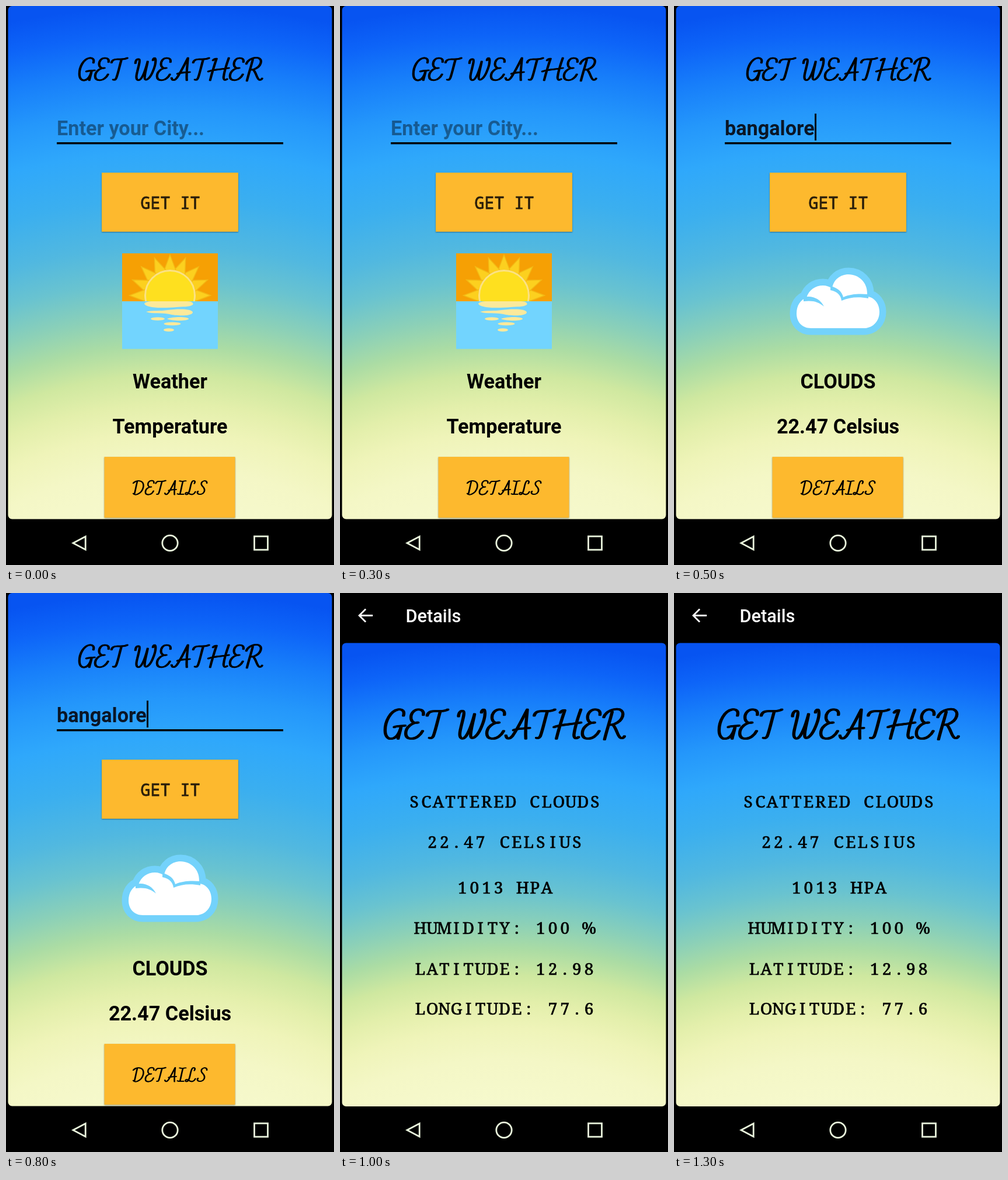
Write an HTML page that moves like this. It is 562 by 956 pixels and loops after 1500 ms.

```html
<!DOCTYPE html>
<html lang="en">
<head>
<meta charset="utf-8">
<title>Get Weather</title>
<style>
  html, body { margin: 0; width: 100%; height: 100%; overflow: hidden; background: #000; }
  svg { display: block; width: 562px; height: 956px; }
  text { font-family: Roboto, sans-serif; }
  .bold { font-weight: 700; font-size: 34.2px; }
  .mid { text-anchor: middle; }
  .mono { font: 500 28.3px "Noto Sans Mono", monospace; fill: #2a1e0a; stroke: #2a1e0a; stroke-width: .8; }
  .slab { font: 400 28px "Noto Serif", serif; stroke: #000; stroke-width: .7; text-anchor: middle; }
  .button { fill: #fdb92e; filter: drop-shadow(0 1px 1px rgba(0, 0, 0, .4)); }
  .script { fill: none; stroke: #000; stroke-width: 2.7; stroke-linecap: round; stroke-linejoin: round; }
  .nav { fill: none; stroke: #e9f4dc; stroke-width: 2.8; }
  .screen { opacity: 0; }
</style>
</head>
<body>
<svg viewBox="0 0 562 956">
  <defs>
    <radialGradient id="sky" gradientUnits="userSpaceOnUse" cx="281"></radialGradient>
    <clipPath id="horizon"><rect x="199" y="423" width="164" height="82"/></clipPath>
  </defs>
  <rect width="562" height="956"/>

  <g class="screen" data-from="0" data-to="2">
    <rect x="3.5" width="555" height="877.5" rx="7" fill="url(#sky)"/>
    <g class="script" data-word="GET WEATHER" transform="translate(124 88)"/>
    <rect x="87" y="233" width="388" height="3.4"/>
    <rect class="button" x="164" y="285" width="234" height="101"/>
    <text class="mono mid" x="281.5" y="347">GET IT</text>
    <rect class="button" x="168.5" y="771" width="224" height="104"/>
    <g class="script" data-word="DETAILS" transform="translate(217 811) scale(.63)"/>
  </g>

  <g class="screen" data-from="0" data-to="1">
    <text class="bold" x="87" y="221" fill="#000" fill-opacity=".42">Enter your City...</text>
    <rect x="199" y="423" width="164" height="82" fill="#f6a004"/>
    <rect x="199" y="505" width="164" height="81.5" fill="#72d4fe"/>
    <g clip-path="url(#horizon)">
      <g id="rays" fill="#fcd01f" stroke="#f3b915" stroke-width="1.5"/>
      <circle cx="281" cy="495" r="42.5" fill="#fee01f" stroke="#fbe284" stroke-width="3"/>
    </g>
    <g fill="#fbe99b">
      <path d="M237 509C239 506 245 505 252 505H310C318 505 322 508 320 511C314 515 302 514 292 515C270 517 240 517 237 509Z"/>
      <path d="M240 523C251 520 265 522 277 520C292 518 319 517 320 524C319 531 291 530 280 527C268 524 251 527 240 523Z"/>
      <ellipse cx="260" cy="535" rx="12" ry="2.8"/>
      <path d="M276 535C285 531 312 531 313 535C312 539 284 539 276 535Z"/>
      <ellipse cx="285" cy="543.5" rx="14.5" ry="2.8"/>
      <ellipse cx="279" cy="554" rx="9" ry="2.8"/>
    </g>
    <text class="bold mid" x="281" y="654">Weather</text>
    <text class="bold mid" x="281" y="731">Temperature</text>
  </g>

  <g class="screen" data-from="1" data-to="2">
    <text class="bold" x="87" y="221" fill="#0a1626">bangalore</text>
    <rect x="241" y="184" width="3" height="46"/>
    <path d="M235 551C219 551 210 540 210 526C210 512 217 502 227 499C231 485 243 478 255 478C261 478 267 480 271 483C273 468 285 459 299 459C317 459 331 473 331 491V497C344 498 352 510 352 523C352 540 340 551 325 551Z"
      fill="#fff" stroke="#73d2fb" stroke-width="23" stroke-linejoin="round" paint-order="stroke"/>
    <path d="M222 498C237 494 251 501 257 514C248 506 238 503 222 505ZM268 479C281 482 288 489 290 498C303 492 318 492 333 493V500C316 497 301 498 287 504C286 495 280 488 268 486Z" fill="#73d2fb"/>
    <text class="bold mid" x="281" y="654">CLOUDS</text>
    <text class="bold mid" x="281" y="731">22.47 Celsius</text>
  </g>

  <g class="screen" data-from="2" data-to="3">
    <path d="M56 38.5H34M44 27.5L33 38.5L44 49.5" fill="none" stroke="#fff" stroke-width="2.8"/>
    <text x="112.5" y="50" font-size="30.7" font-weight="500" fill="#fff">Details</text>
    <rect x="3.5" width="555" height="877.5" rx="7" fill="url(#sky)" transform="translate(0 85.5) scale(1 .903)"/>
    <g class="script" data-word="GET WEATHER" transform="translate(75 198) scale(1.31)"/>
    <g id="report"/>
  </g>

  <g class="nav">
    <path d="M115 918.5L136.2 907.3V929.7Z"/>
    <circle cx="281" cy="918.5" r="13.2"/>
    <rect x="425.5" y="907" width="23" height="23"/>
  </g>
</svg>

<script>
const PERIOD = 1500, STEPS = 3;
const GLOW_Y = 1380, GLOW_R = 1400;

// Script capitals: advance width and pen path, 40 units tall.
const LETTERS = {
  A: [34, "M0 35C1 40 5 40 9 35C16 25 22 12 28 1C27 14 25 26 26 39M10 28C17 25 24 26 31 25"],
  D: [33, "M12 3C9 14 7 26 4 38M1 8C7 1 20 -1 26 6C32 14 27 30 16 36C10 40 4 40 1 36"],
  E: [26, "M24 8C25 3 22 1 18 1C11 1 7 7 8 13C9 18 13 19 17 18C9 18 1 24 1 32C1 37 4 39 9 39C14 39 20 35 23 29"],
  G: [27, "M25 9C27 3 23 0 18 1C8 3 1 16 1 28C1 36 5 40 10 39C16 38 20 31 22 23M13 24C17 22 22 23 27 22M22 23C21 29 19 34 18 39"],
  H: [37, "M9 5C11 2 13 2 15 2C11 14 7 27 4 39M36 1C32 12 28 25 27 34C27 38 29 40 33 37M1 24C10 20 22 21 36 18"],
  I: [22, "M6 2C12 4 18 2 23 2M15 3C12 14 10 26 7 38M0 37C6 40 12 37 17 38"],
  L: [31, "M24 9C28 3 24 0 20 2C13 6 14 26 8 35C5 40 0 40 0 36C0 32 6 33 11 37C17 41 24 38 27 31"],
  R: [32, "M14 4C11 16 7 28 4 40M3 11C6 3 17 -1 24 1C31 4 29 15 17 20C14 21 12 21 11 21M15 21C20 26 21 36 25 38C27 39 29 38 30 36"],
  S: [30, "M27 8C28 3 24 1 19 2C12 4 10 10 14 15C18 19 23 24 20 31C17 38 8 40 3 37C1 35 1 32 3 30"],
  T: [28, "M3 9C4 4 8 3 13 3C19 3 24 4 30 1M20 4C17 14 15 24 12 33C11 37 9 39 6 38"],
  W: [40, "M4 10C4 5 7 2 10 3C13 4 9 16 7 25C5 33 5 38 9 39C15 39 21 22 25 7C23 18 19 30 20 36C21 41 28 37 33 26C37 17 40 8 38 2C37 0 34 2 34 5"],
  " ": [12, ""]
};

const SKY = [
  [0, "#0754f1"], [50, "#0d64f8"], [110, "#177efa"], [180, "#2497fb"],
  [250, "#2fa8fb"], [330, "#3bafef"], [410, "#51b8e0"], [470, "#69c3d0"],
  [530, "#8bd0b8"], [580, "#abdca4"], [630, "#cfe8a0"], [680, "#e3efab"],
  [730, "#eff4b9"], [790, "#f4f7c6"], [877, "#f6f9cd"]
];

const REPORT = [
  [367, "SCATTERED CLOUDS"], [436, "22.47 CELSIUS"], [514, "1013 HPA"],
  [583, "HUMIDITY: 100 %"], [653, "LATITUDE: 12.98"], [721, "LONGITUDE: 77.6"]
];

const $ = id => document.getElementById(id);

function add(parent, tag, attrs) {
  const node = document.createElementNS("http://www.w3.org/2000/svg", tag);
  for (const key in attrs) node.setAttribute(key, attrs[key]);
  return parent.appendChild(node);
}

$("sky").setAttribute("cy", GLOW_Y);
$("sky").setAttribute("r", GLOW_R);
for (const [y, color] of SKY.slice().reverse())
  add($("sky"), "stop", { offset: (GLOW_Y - y) / GLOW_R, "stop-color": color });

// Two shifted strokes act as a broad nib.
for (const group of document.querySelectorAll("[data-word]")) {
  let x = 0;
  group.setAttribute("aria-label", group.dataset.word);
  for (const ch of group.dataset.word) {
    const [width, d] = LETTERS[ch];
    for (const nib of [0, 1.5]) if (d) add(group, "path", { d, transform: `translate(${x + nib} 0)` });
    x += width;
  }
}

for (let i = 0; i < 9; i++)
  add($("rays"), "path", { d: "M350.5 495L324 485V505Z", transform: `rotate(${-22.5 * i} 281 495)` });

for (const [y, line] of REPORT) {
  const pitch = 20.65, start = 282 - (line.length - 1) * pitch / 2;
  const xs = [...line].map((_, i) => (start + i * pitch).toFixed(2)).join(" ");
  add($("report"), "text", { class: "slab", x: xs, y }).textContent = line;
}

for (const screen of document.querySelectorAll(".screen")) {
  const { from, to } = screen.dataset;
  const frames = Array.from({ length: STEPS + 1 }, (_, i) => ({
    opacity: i >= from && i < to ? 1 : 0, offset: i / STEPS, easing: "step-end"
  }));
  screen.animate(frames, { duration: PERIOD, iterations: Infinity }).startTime = 0;
}
</script>
</body>
</html>
```
